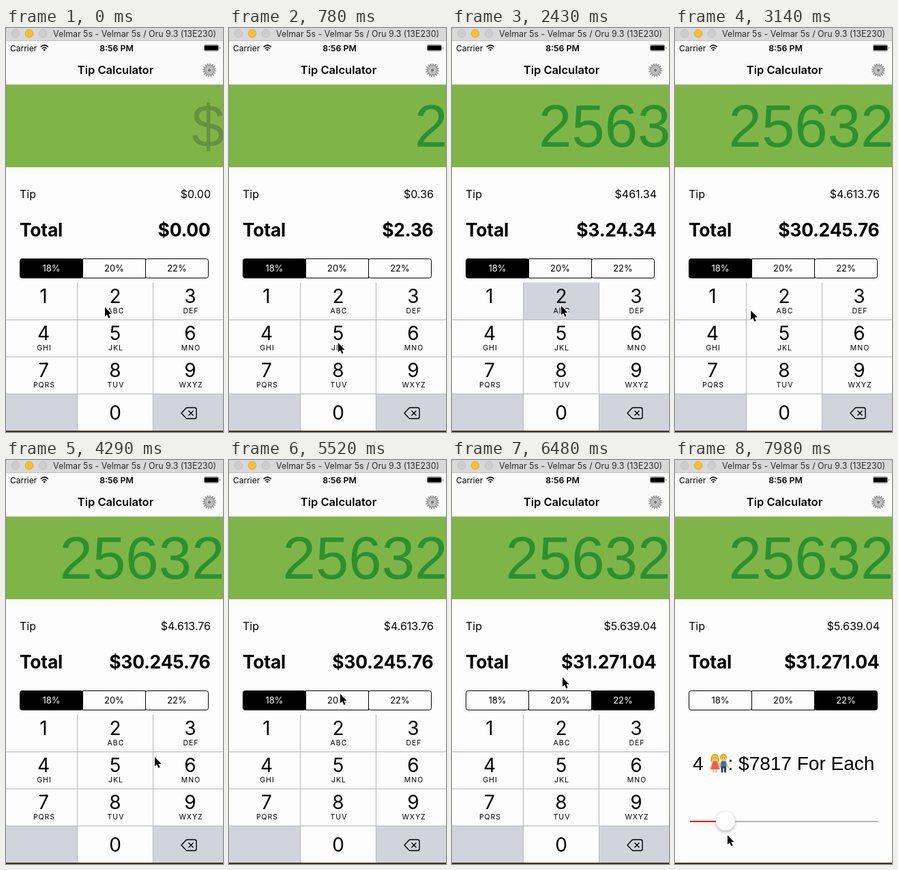
Write an HTML page that moves like this. It is 318 by 589 pixels and loops after 8 s.

```html
<!DOCTYPE html>
<html lang="en">
<head>
<meta charset="utf-8">
<title>Tip Calculator</title>
<style>
  html, body { margin: 0; width: 100%; height: 100%; overflow: hidden; background: #fdfdfd; }
  svg { display: block; width: 100%; height: 100%; }
  text { font-family: Inter, Roboto, sans-serif; white-space: pre; }
  .mid { text-anchor: middle; }
  .end { text-anchor: end; }
  .row { font-size: 16px; }
  .total { font-size: 26.5px; font-weight: 700; letter-spacing: -.01em; }
  .bill { font: 87px "Liberation Sans", Arial, sans-serif; }
  .split { font: 28px "Liberation Sans", Arial, sans-serif; }
  .digit { font-size: 28px; }
  .sub { font-size: 10.5px; letter-spacing: 1px; }
  .seg { font-size: 13px; }
</style>
</head>
<body>
<svg viewBox="0 0 318 589">
  <defs>
    <filter id="soft" x="-50%" y="-50%" width="200%" height="200%">
      <feDropShadow dx="0" dy="2" stdDeviation="2" flood-opacity=".3"/>
    </filter>
  </defs>
  <rect width="318" height="589" fill="#fdfdfd"/>

  <!-- window bar -->
  <rect width="318" height="18" fill="#d8d8d8"/>
  <rect y="18" width="318" height="1" fill="#c2c2c2"/>
  <g fill="#cdcdcd" stroke="#bdbdbd" stroke-width=".8">
    <circle cx="14" cy="8" r="5.8"/>
    <circle cx="34" cy="8" r="5.8" fill="#fdbd2e" stroke="#dfa023"/>
    <circle cx="54" cy="8" r="5.8"/>
  </g>
  <text x="69" y="13" font-size="12.4" fill="#2c2c2c">Velmar 5s - Velmar 5s / Oru 9.3 (13E230)</text>

  <!-- status and navigation -->
  <rect y="19" width="318" height="63" fill="#fafafa"/>
  <text x="6" y="33.5" font-size="12">Carrier</text>
  <g fill="none" stroke="#000" stroke-width="1.6">
    <path d="M50.8 27.6Q56.3 22.8 61.8 27.6M52.8 30Q56.3 27 59.8 30"/>
    <path d="M54.4 31.4Q56.3 30 58.2 31.4L56.3 33.6Z" fill="#000" stroke="none"/>
  </g>
  <text class="mid" x="162" y="33.5" font-size="12.3" font-weight="600">8:56 PM</text>
  <rect x="290.5" y="24.5" width="21" height="9" rx="1.8" fill="none" stroke="#777" stroke-width=".8"/>
  <rect x="291" y="25.5" width="20" height="7" rx=".8"/>
  <path d="M313 27.5q1.6 1.600 0 3.200z"/>
  <text class="mid" x="160.5" y="67" font-size="16.5" font-weight="600">Tip Calculator</text>
  <g transform="translate(298 61.500)" fill="none">
    <circle r="8.8" stroke="#8c8c8c" stroke-width="2" stroke-dasharray="1.8 1.656"/>
    <circle r="7" fill="#cfcfcf" stroke="#8f8f8f" stroke-width="1.6"/>
    <circle r="4.4" stroke="#a9a9a9" stroke-width="1.2"/>
    <circle r="2.2" fill="#777"/>
  </g>

  <!-- bill -->
  <rect y="82" width="318" height="1" fill="#c4c4c4"/>
  <rect y="83" width="318" height="120" fill="#7fb548"/>
  <text id="bill" class="bill end" x="320.5" y="172.5"></text>

  <!-- amounts -->
  <text class="row" x="20" y="247.5">Tip</text>
  <text id="tip" class="row end" x="300" y="247.5"></text>
  <text class="total" x="20" y="304">Total</text>
  <text id="total" class="total end" x="299.5" y="304"></text>
  <g id="rates"></g>

  <!-- split -->
  <text class="split" x="26" y="452">4</text>
  <g fill="#fbc84a" stroke-linecap="round">
    <path d="M57 441l-5 8M74 440l4 8M62 441l3.500 7 3.500-7M56.500 450v5M60.500 450v5" stroke="#fbc84a" stroke-width="2.400"/>
    <path d="M55.500 439h6l4 12h-13z" fill="#f0596c"/>
    <path d="M67.500 439h7l1 9h-8.500z" fill="#2f6fc4"/>
    <path d="M67.500 447h7.500v8.500h-3v-6h-1.500v6h-3z" fill="#26406f"/>
    <path d="M53.500 435v4M63.500 435v4" stroke="#e5a21f" stroke-width="2.400"/>
    <circle cx="58.500" cy="433.500" r="5.200" fill="#e5a21f"/>
    <circle cx="71" cy="433.500" r="5.200" fill="#e5a21f"/>
    <circle cx="58.500" cy="434.800" r="4"/>
    <circle cx="71" cy="434.800" r="4"/>
    <path d="M57 434.500h.1M60 434.500h.1M69.500 434.500h.1M72.500 434.500h.1" stroke="#5a3a1a" stroke-width="1.200"/>
  </g>
  <text id="each" class="split" x="77.500" y="452"></text>
  <path d="M74 527H298" stroke="#b5b5b5" stroke-width="2"/>
  <path d="M22 527H74" stroke="#f00" stroke-width="2"/>
  <circle cx="74" cy="526" r="14" fill="#fff" stroke="#ddd" stroke-width=".5" filter="url(#soft)"/>

  <g id="pad"></g>
  <rect y="587" width="318" height="2" fill="#3d3622"/>
  <path id="cursor" d="M0 0V13.500L3 10.700L5.400 16L7.600 15L5.300 9.900H9.600Z" stroke="#fff" stroke-width="2.200" paint-order="stroke"/>
</svg>
<script>
const LOOP = 8000, TICK = 87;
const $ = id => document.getElementById(id);

const colLeft = [0, 105, 216, 318], colMid = [55, 160, 270];
const rates = [18, 20, 22];
const segEdge = i => 20.5 + 92 * i;
const rowTop = n => 371 + 54 * Math.floor((n - 1) / 3);
const key = n => [colMid[(n - 1) % 3], rowTop(n) + 34];

// Key taps: time and digit; the digit appears on release
const taps = [[90, 2], [870, 5], [1300, 6], [1820, 3], [2430, 2]]
  .map(([down, digit]) => ({ down, up: down + TICK, digit }));

// Cursor glides: start, end, goal
const rest = [145, 407];
const glides = [
  [260, 780, key(5)],
  [1040, 1210, key(6)],
  [1390, 1650, [239, 410]],
  [2000, 2260, key(2)],
  [2790, 3230, [111, 412]],
  [3940, 4290, [218, 433]],
  [4560, 4740, [232, 237]],
  [4910, 5000, [288, 225]],
  [5090, 5350, [63, 288]],
  [5440, 5520, [163, 341]],
  [5870, 6040, [246, 345]],
  [6220, 6480, [162, 317]],
  [6570, 6830, [121, 263]],
  [7180, 7450, [87, 567]],
  [7720, 7980, [77, 547]]
];

function progress(t, start, end) {
  if (t < start) return 0;
  const steps = Math.round((end - start) / TICK) + 1;
  const p = Math.min(1, (Math.floor((t - start) / TICK + .1) + 1) / steps);
  return 1 - (1 - p) ** 3;
}

function cursorAt(t) {
  return glides.reduce((pos, [start, end, goal]) => {
    const p = progress(t, start, end);
    return pos.map((v, i) => v + (goal[i] - v) * p);
  }, rest);
}

// Groups are joined without zero padding, as the app shows them
function money(cents) {
  const whole = Math.floor(cents / 100);
  const head = whole < 1000 ? whole : Math.floor(whole / 1000) + "." + whole % 1000;
  return "$" + head + "." + String(cents % 100).padStart(2, "0");
}

function buildPad() {
  const subs = ["", "ABC", "DEF", "GHI", "JKL", "MNO", "PQRS", "TUV", "WXYZ"];
  let s = '<rect y="371" width="318" height="216" fill="#fdfdfd"/>';
  subs.forEach((sub, i) => {
    const c = i % 3, y = rowTop(i + 1);
    s += `<rect id="key${i + 1}" x="${colLeft[c]}" y="${y}" width="${colLeft[c + 1] - colLeft[c]}" height="54" fill="#d1d5db"/>
      <text class="digit mid" x="${colMid[c]}" y="${y + 30}">${i + 1}</text>
      <text class="sub mid" x="${colMid[c] + 1}" y="${y + 45}">${sub}</text>`;
  });
  s += `<path d="M0 533H104V587H0ZM216 533H318V587H216Z" fill="#d1d5db"/>
    <text class="digit mid" x="160" y="570.5">0</text>
    <path d="M104.5 371V587M215.5 371V587M0 425.5H318M0 479.5H318M0 533.5H318" stroke="#b4b6b9"/>
    <path d="M257 561.5L263.5 554.5Q264.3 553.5 265.5 553.5H276.5Q279 553.5 279 556V567Q279 569.5 276.5 569.5H265.5Q264.3 569.5 263.5 568.5ZM267.5 558L274.5 565M274.5 558L267.5 565"
      fill="none" stroke="#000" stroke-width="1.4" stroke-linejoin="round"/>`;
  $("pad").innerHTML = s;
}

function buildRates() {
  const segs = rates.map((rate, i) => `
    <rect id="seg${i}" x="${segEdge(i)}" y="336.5" width="92" height="28" rx="${i === 1 ? 0 : 3}" stroke="#000"/>
    <text id="rate${i}" class="seg mid" x="${segEdge(i + .5)}" y="355">${rate}%</text>`);
  $("rates").innerHTML = segs.join("");
}

function draw(t) {
  const typed = taps.filter(tap => t >= tap.up).map(tap => tap.digit).join("");
  const pick = t < 5780 ? 0 : t < 6125 ? 1 : 2;
  const bill = Number(typed);
  const tip = bill * rates[pick];
  const total = tip + bill * 100;

  $("bill").textContent = typed || "$";
  $("bill").setAttribute("fill", typed ? "#2b912f" : "#65923f");
  $("tip").textContent = money(tip);
  $("total").textContent = money(total);
  $("each").textContent = `: $${Math.floor(total / 400)} For Each`;

  rates.forEach((_, i) => {
    $("seg" + i).setAttribute("fill", i === pick ? "#000" : "#fdfdfd");
    $("rate" + i).setAttribute("fill", i === pick ? "#fff" : "#000");
  });
  for (let n = 1; n <= 9; n++) {
    const down = taps.some(tap => tap.digit === n && t >= tap.down && t < tap.up);
    $("key" + n).setAttribute("visibility", down ? "inherit" : "hidden");
  }

  $("pad").setAttribute("transform", `translate(0 ${218 * progress(t, 7000, 7450)})`);
  $("cursor").setAttribute("transform", `translate(${cursorAt(t)})`);
}

buildPad();
buildRates();
const begin = performance.now();
function tick() {
  draw((performance.now() - begin) % LOOP);
  requestAnimationFrame(tick);
}
tick();
</script>
</body>
</html>
```
